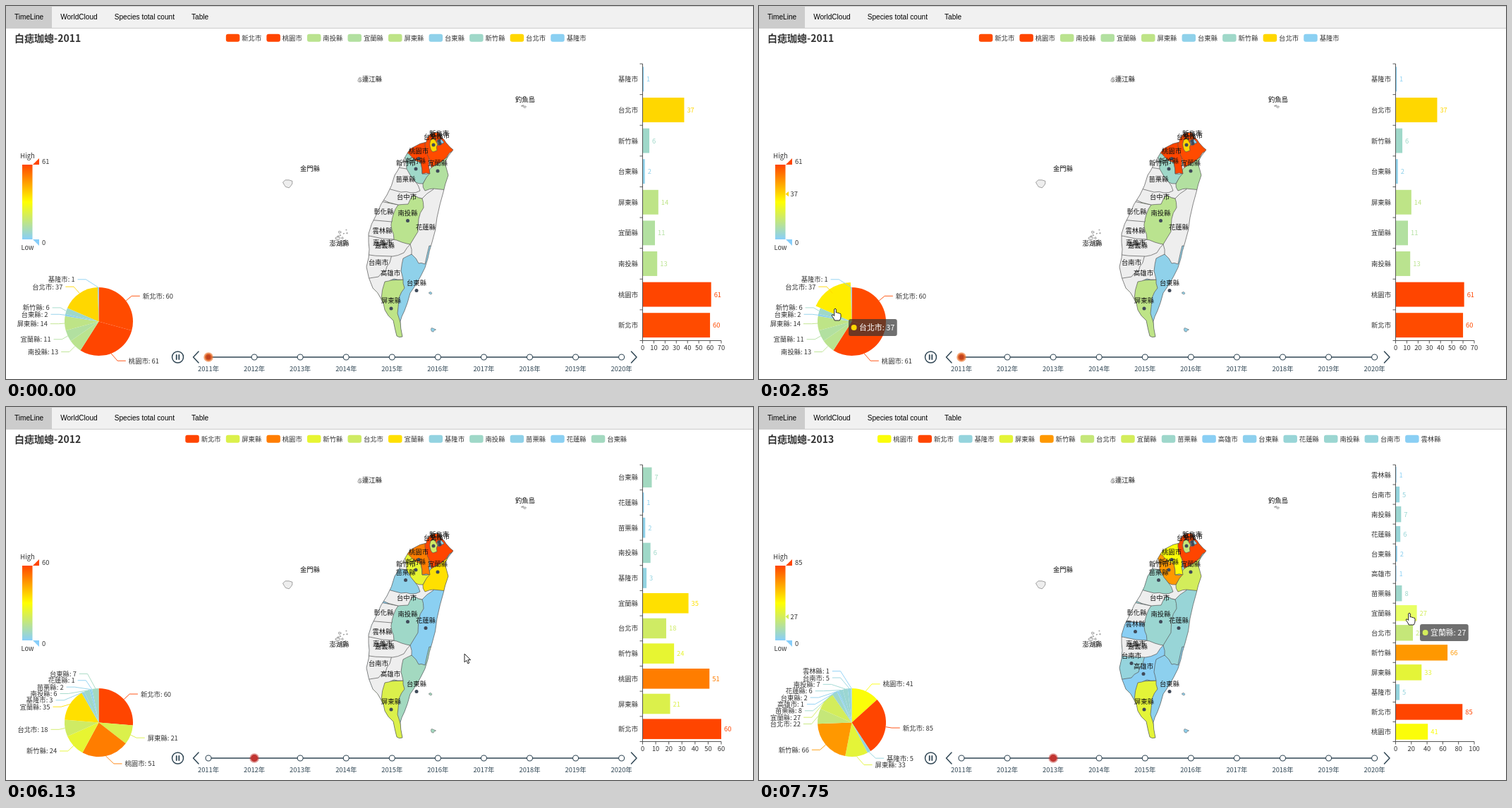
Write an HTML page with a canvas that moves like this. It is 1059 px wide and 529 px high and loops after 8 s.

```html
<!DOCTYPE html>
<html lang="zh-Hant">
<head>
<meta charset="utf-8">
<title>Timeline</title>
<style>
html, body { margin: 0; width: 100%; height: 100%; overflow: hidden; background: #fff; }
canvas { display: block; width: 1059px; height: 529px; }
</style>
</head>
<body>
<canvas id="stage"></canvas>
<script>
const W = 1059, H = 529, LOOP = 8000, MORPH = 420, TAU = Math.PI * 2;
const canvas = document.getElementById('stage');
const c = canvas.getContext('2d');
const dpr = window.devicePixelRatio || 1;
canvas.width = W * dpr;
canvas.height = H * dpr;

const CJK = '"Noto Sans CJK TC", "Noto Sans CJK JP", "Noto Sans CJK", sans-serif';
const ARIAL = '"Liberation Sans", Arial, sans-serif';
const INK = '#304654', AXIS = '#444';
const PIE = { x: 131.5, y: 447.5, r: 48.5 };

const clamp = v => Math.max(0, Math.min(1, v));
const easeOut = p => 1 - (1 - clamp(p)) ** 3;
const smooth = p => p * p * (3 - 2 * p);
const mix = (a, b, p) => a + (b - a) * p;

const ramp = [[135, 206, 250], [255, 255, 0], [255, 69, 0]];
function color(share, lift = 1) {
  const p = share * 2, i = Math.min(1, Math.floor(p));
  return `rgb(${ramp[i].map((a, k) => Math.min(255, Math.round(mix(a, ramp[i + 1][k], p - i) * lift)))})`;
}

const years = [
  { at: 0, year: 2011, data: '新北市 60|桃園市 61|南投縣 13|宜蘭縣 11|屏東縣 14|台東縣 2|新竹縣 6|台北市 37|基隆市 1' },
  { at: 2920, year: 2012, data: '新北市 60|屏東縣 21|桃園市 51|新竹縣 24|台北市 18|宜蘭縣 35|基隆市 3|南投縣 6|苗栗縣 2|花蓮縣 1|台東縣 7' },
  { at: 6900, year: 2013, data: '桃園市 41|新北市 85|基隆市 5|屏東縣 33|新竹縣 66|台北市 22|宜蘭縣 27|苗栗縣 8|高雄市 1|台東縣 2|花蓮縣 6|南投縣 7|台南市 5|雲林縣 1' }
];
for (const y of years) {
  y.rows = y.data.split('|').map(s => ({ name: s.split(' ')[0], v: +s.split(' ')[1] }));
  y.max = Math.max(...y.rows.map(r => r.v));
  y.step = y.max / 5 < 15 ? 10 : 20;
  y.axis = Math.ceil(y.max / y.step) * y.step;
  y.by = {};
  const total = y.rows.reduce((s, r) => s + r.v, 0);
  let a = 0;
  for (const r of y.rows) {
    r.a0 = a;
    r.a1 = a += r.v / total * TAU;
    r.mid = (r.a0 + r.a1) / 2;
    r.side = r.mid < Math.PI ? 1 : -1;
    r.fill = color(r.v / y.max);
    r.lit = color(r.v / y.max, 1.1);
    y.by[r.name] = r;
  }
  for (const side of [1, -1]) placeLabels(y.rows.filter(r => r.side === side));
}

// stack crowded labels, centre each stack, then set them on an ellipse
function placeLabels(rows) {
  const pitch = 9.36, runs = [];
  const wish = r => PIE.y - 59.7 * Math.cos(r.mid);
  let prev = -Infinity;
  for (const r of rows.sort((p, q) => wish(p) - wish(q))) {
    if (wish(r) > prev + pitch) runs.push([]);
    r.y = prev = Math.max(wish(r), prev + pitch);
    runs[runs.length - 1].push(r);
  }
  for (const run of runs) {
    const last = run[run.length - 1], shift = (last.y - wish(last)) / 2;
    for (const r of run) {
      r.y -= shift;
      const dy = Math.min(.96, Math.abs(r.y - PIE.y) / 63);
      r.x = PIE.x + r.side * (57 * Math.sqrt(1 - dy * dy) + 15.7);
    }
  }
}

// roughen each edge at its middle, by place
function outline(text) {
  const p = text.split(' ').map(s => s.split(',').map(Number));
  let d = '';
  p.forEach(([x, y], i) => {
    const [u, v] = p[(i + 1) % p.length], h = (x + u) * 1.7 + (y + v) * 2.3;
    d += `${i ? 'L' : 'M'}${x},${y}`;
    if (Math.hypot(u - x, v - y) > 5) d += `L${(x + u) / 2 + Math.sin(h) * 1.2},${(y + v) / 2 + Math.cos(h) * 1.2}`;
  });
  return new Path2D(d + 'Z');
}

let seed = 7;
const rand = () => (seed = seed * 16807 % 2147483647) / 2147483647;
function blob(x, y, r) {
  const path = new Path2D();
  for (let a = 0; a < TAU; a += TAU / 9) {
    const k = r * (.55 + .6 * rand());
    path.lineTo(x + k * Math.cos(a), y + k * .75 * Math.sin(a));
  }
  path.closePath();
  return path;
}

const coast = outline('599,185 606,180 613,179 618,187 624,194 634,204 622,222 627,240 620,264 611,300 604,335 598,358 588,383 573,407 565,432 559,447 562,469 554,468 549,446 537,431 531,414 520,400 511,370 515,345 514,323 525,296 540,268 551,240 558,228 570,207 578,200 596,193');

// name, centre, area; cut by the coast, each area covers those before it
const regions = [
  ['花蓮縣', 595, 313.5, '500,170 650,170 650,480 500,480'],
  ['台東縣', 582, 403.5, '620,340 600,340 594,366 585,365 575,352 540,352 540,480 620,480'],
  ['屏東縣', 546, 429, '563,388 565,400 557,414 555,436 570,475 520,475 520,388'],
  ['高雄市', 545, 378.5, '573,338 575,352 563,358 560,376 563,388 550,387 537,391 532,416 500,416 500,338'],
  ['台南市', 528, 363.5, '500,340 548,340 544,364 538,376 528,384 500,386'],
  ['嘉義縣', 537, 339, '500,320 561,330 573,338 564,350 548,355 500,351'],
  ['南投縣', 569.5, 304.5, '540,268 578,268 590,273 592,286 585,302 584,320 573,338 561,335 547,331'],
  ['雲林縣', 533.5, 318.5, '500,300 547,304 547,318 550,331 534,330 500,325'],
  ['彰化縣', 535.5, 291, '500,270 556,282 549,296 547,306 500,304'],
  ['台中市', 568, 270, '530,240 600,240 606,260 590,273 578,268 570,281 556,282 530,273'],
  ['苗栗縣', 566.5, 245.5, '530,220 568,228 581,250 587,262 574,265 560,264 530,257'],
  ['宜蘭縣', 612, 234, '603,229 617,221 640,200 650,264 606,259 594,262 591,252 600,236'],
  ['新竹縣', 581, 231, '571,200 588,222 590,238 601,237 591,252 581,250 568,231 556,220'],
  ['新竹市', 567, 222.5, '550,216 566,215 568,231 550,227'],
  ['桃園市', 585, 216.5, '560,195 597,185 600,215 601,238 590,238 588,222 576,215 566,207'],
  ['新北市', 614, 191.5, '594,190 596,170 650,170 640,205 629,208 617,221 603,229 596,208'],
  ['台北市', 606, 197, '602,190 608,188 612,196 611,205 605,207 601,199'],
  ['基隆市', 615, 195, '611,191 617,189 621,194 613,198']
].map(([name, x, y, pts]) => ({ name, x, y, shape: outline(pts) }));

// name, label, island group centre, largest size, count, spread
const isles = [
  ['金門縣', 431, 230, 400, 252, 8, 1, 0],
  ['澎湖縣', 472.5, 336, 476, 329, 5, 12, 15],
  ['連江縣', 519, 103, 503, 103, 3, 3, 4],
  ['釣魚島', 736, 132, 734, 139, 2, 3, 6],
  ['嘉義市', 534, 335, 536, 338, 4, 1, 0],
  ['台東縣', 0, 0, 602, 407, 2.5, 1, 0],
  ['台東縣', 0, 0, 605, 459, 4, 1, 0]
].map(([name, x, y, cx, cy, size, count, spread]) => ({
  name, x, y,
  shapes: Array.from({ length: count }, (_, i) =>
    blob(cx + (rand() - .5) * spread, cy + (rand() - .5) * spread * 1.6, size / (1 + i * .6)))
}));

// each tooltip glides in from the place of the one before
const hovers = [
  { a: 1470, b: 1680, on: 'map', name: '屏東縣', x: 553, y: 440 },
  { a: 1680, b: 2400, on: 'pie', name: '桃園市', x: 163, y: 450 },
  { a: 2400, b: 2920, on: 'pie', name: '台北市', x: 127, y: 444 },
  { a: 2920, b: 3800, on: 'pie', name: '台東縣', x: 127, y: 428 },
  { a: 4150, b: 4500, on: 'map', name: '花蓮縣', x: 630, y: 330 },
  { a: 5080, b: 5360, on: 'map', name: '宜蘭縣', x: 637, y: 275 },
  { a: 7330, b: 8000, on: 'bar', name: '宜蘭縣', x: 937, y: 308 }
];
// pointer: arrives, leaves, x, y
const stops = [
  [1310, 1310, 545, 500], [1500, 1560, 537, 428], [1900, 2160, 147, 459], [2500, 2920, 108, 429],
  [3400, 3870, 74, 372], [4560, 4650, 634, 311], [4800, 4950, 606, 321], [5180, 5200, 614, 259],
  [5500, 6130, 650, 350], [6750, 6900, 803.5, 354.5], [7400, 8000, 922, 292]
];
const arrow = new Path2D('M0,0V12L2.8,9.4L4.8,13.8L6.8,12.9L4.8,8.7H8.6Z');
const hand = new Path2D('M-1.3,1Q0-.8 1.3,1V6Q2.8,5 3.8,6.5Q5.2,5.6 6,7.2Q8,6.7 8,8.5V12Q8,14.5 6.2,17H-.8Q-1.8,14-4.6,10.5Q-5,8-2.8,9L-1.3,10.5Z');

function text(s, x, y, { size = 9.35, fill = '#333', align = 'left', family = CJK, weight = 'normal' } = {}) {
  c.font = `${weight} ${size}px ${family}`;
  c.fillStyle = fill;
  c.textAlign = align;
  c.textBaseline = 'middle';
  c.fillText(s, x, y);
}
function rect(x, y, w, h, fill) {
  c.fillStyle = fill;
  c.fillRect(x, y, w, h);
}
function line(pts, stroke, width = .9) {
  c.beginPath();
  pts.forEach(([x, y]) => c.lineTo(x, y));
  c.strokeStyle = stroke;
  c.lineWidth = width;
  c.stroke();
}
function poly(pts, fill) {
  c.beginPath();
  pts.forEach(([x, y]) => c.lineTo(x, y));
  c.fillStyle = fill;
  c.fill();
}
function paint(path, fill, stroke, width = 1) {
  c.fillStyle = fill;
  c.strokeStyle = stroke;
  c.lineWidth = width;
  c.fill(path);
  c.stroke(path);
}
function disc(x, y, r, fill, stroke, width = 1) {
  c.beginPath();
  c.arc(x, y, r, 0, TAU);
  if (fill) { c.fillStyle = fill; c.fill(); }
  if (stroke) { c.strokeStyle = stroke; c.lineWidth = width; c.stroke(); }
}
function pill(x, y, w, h, r, fill) {
  c.beginPath();
  c.roundRect(x, y, w, h, r);
  c.fillStyle = fill;
  c.fill();
}

function drawNav() {
  rect(0, 0, W, 32, '#f1f1f1');
  rect(0, 1, 65, 30, '#ccc');
  rect(0, 0, W, 1, '#ccc');
  rect(0, 31, W, 1, '#ccc');
  let x = 12;
  for (const s of ['TimeLine', 'WorldCloud', 'Species total count', 'Table']) {
    text(s, x, 16.3, { size: 10.1, fill: '#000', family: ARIAL });
    x += c.measureText(s).width + 24;
  }
}

function drawLegend(y) {
  text('白痣珈蟌-' + y.year, 12, 46, { size: 14, weight: 'bold' });
  const pitch = 57.55, start = 567 - (y.rows.length * pitch - 7.6) / 2;
  y.rows.forEach((r, i) => {
    pill(start + i * pitch, 39.7, 19.5, 11, 3, r.fill);
    text(r.name, start + i * pitch + 22.4, 45);
  });
}

function drawScale(y, hover) {
  const top = 225, low = 331;
  const g = c.createLinearGradient(0, low, 0, top);
  ramp.forEach((k, i) => g.addColorStop(i / 2, `rgb(${k})`));
  rect(23, top, 14.5, low - top, g);
  poly([[38, top], [47, top], [47, top - 9]], color(1));
  poly([[38, low], [47, low], [47, low + 9]], color(0));
  text('High', 30.5, 212, { align: 'center' });
  text('Low', 30.5, 342.5, { align: 'center' });
  text(y.max, 51, 220);
  text('0', 51, 335.5);
  if (!hover) return;
  const r = y.by[hover.name], iy = mix(low, top, r.v / y.max);
  poly([[37.5, iy], [42, iy - 3.6], [42, iy + 3.6]], r.fill);
  text(r.v, 44.5, iy);
}

function drawMap(y, hover) {
  const lit = hover && hover.on === 'map' && hover.name;
  const fillOf = n => n === lit ? '#ffdf33' : y.by[n] ? y.by[n].fill : '#eee';
  c.lineJoin = 'round';
  c.save();
  c.clip(coast);
  for (const r of regions) paint(r.shape, fillOf(r.name), '#555', .7);
  c.restore();
  c.strokeStyle = '#555';
  c.lineWidth = .7;
  c.stroke(coast);
  for (const g of isles) for (const s of g.shapes) paint(s, fillOf(g.name), '#666', .6);
  for (const r of regions) if (y.by[r.name]) disc(r.x, r.y, 2.5, '#404a59');
  for (const r of [...regions, ...isles.filter(g => g.x)])
    text(r.name, r.x, r.y - (y.by[r.name] ? 11.5 : 0), { align: 'center', fill: '#111' });
}

function drawPie(y, old, p, hover, t) {
  const gone = { a0: TAU, a1: TAU };
  for (const r of y.rows) {
    const from = old ? old.by[r.name] || gone : r;
    const a0 = mix(from.a0, r.a0, p), a1 = Math.max(a0, mix(from.a1, r.a1, p));
    const lit = hover && hover.on === 'pie' && hover.name === r.name;
    const radius = PIE.r + (lit ? 7 * easeOut((t - hover.a) / 250) : 0);
    c.beginPath();
    c.moveTo(PIE.x, PIE.y);
    c.arc(PIE.x, PIE.y, radius, a0 - TAU / 4, a1 - TAU / 4);
    c.fillStyle = lit ? r.lit : r.fill;
    c.fill();
    const end = r.x - 4 * r.side;
    line([[PIE.x + PIE.r * Math.sin(r.mid), PIE.y - PIE.r * Math.cos(r.mid)], [end - 11.7 * r.side, r.y], [end, r.y]], r.fill);
    text(`${r.name}: ${r.v}`, r.x, r.y, { align: r.side > 0 ? 'left' : 'right' });
  }
}

function drawBars(y, old, p, hover) {
  const x0 = 902.5, top = 82, low = 474.5, span = 111.5;
  const box = (s, i) => {
    const band = (low - top) / s.rows.length;
    return { w: s.rows[i].v / s.axis * span, cy: low - (i + .5) * band, h: band * .8 };
  };
  const band = (low - top) / y.rows.length;
  y.rows.forEach((r, i) => {
    const to = box(y, i);
    const from = !old ? to : old.rows[i] ? box(old, i) : { ...to, w: 0 };
    const w = mix(from.w, to.w, p), cy = mix(from.cy, to.cy, p), h = mix(from.h, to.h, p);
    const lit = hover && hover.on === 'bar' && hover.name === r.name;
    rect(x0, cy - h / 2, w, h, lit ? r.lit : r.fill);
    text(r.v, x0 + w + 4, cy, { fill: r.fill });
    text(r.name, 896, to.cy, { align: 'right' });
  });
  line([[x0, top], [x0, low], [x0 + span, low]], AXIS);
  for (let i = 0; i <= y.rows.length; i++) line([[x0 - 4, low - i * band], [x0, low - i * band]], AXIS);
  for (let v = 0; v <= y.axis; v += y.step) {
    const x = x0 + v / y.axis * span;
    line([[x, low], [x, low + 4]], AXIS);
    text(v, x, 484, { align: 'center' });
  }
}

function drawTimeline(index, p) {
  const cy = 498, at = i => 287 + i * 65.07;
  c.lineCap = 'round';
  disc(243.5, cy, 8, null, INK, 1.5);
  for (const x of [241.7, 245.3]) line([[x, cy - 3], [x, cy + 3]], INK, 1.8);
  line([[273, cy - 8], [265.5, cy], [273, cy + 8]], INK, 1.5);
  line([[886.5, cy - 8], [894, cy], [886.5, cy + 8]], INK, 1.5);
  c.lineCap = 'butt';
  line([[at(0), cy], [at(9), cy]], INK, 1.6);
  for (let i = 0; i < 10; i++) {
    disc(at(i), cy, 4, '#fff', INK, 1.1);
    text(2011 + i + '年', at(i), 514.5, { align: 'center', fill: INK });
  }
  const x = at(mix(Math.max(0, index - 1), index, p));
  disc(x, cy, 5, index ? '#c23531' : '#c2431f', index ? 'rgba(194,53,49,.5)' : 'rgba(236,120,50,.65)', 3.6);
}

function drawTip(y, t) {
  const i = hovers.findLastIndex(h => t >= h.a), h = hovers[i];
  if (!h || t > h.b + 120) return;
  const from = hovers[i - 1] || h, p = easeOut((t - h.a) / 380);
  const x = mix(from.x, h.x, p), ty = mix(from.y, h.y, p);
  const r = y.by[h.name], s = `${r.name}: ${r.v}`, style = { size: 10.9, weight: 500, fill: '#fff' };
  c.globalAlpha = 1 - clamp((t - h.b) / 120);
  c.font = `500 ${style.size}px ${CJK}`;
  pill(x, ty, c.measureText(s).width + 18.5, 24, 3, 'rgba(50,50,50,.7)');
  disc(x + 7.6, ty + 12, 4, r.fill);
  text(s, x + 15, ty + 12, style);
  c.globalAlpha = 1;
}

function drawCursor(t, hover) {
  const i = stops.findLastIndex(s => t >= s[0]);
  if (i < 0) return;
  const [, leave, x, y] = stops[i], [arrive, , u, v] = stops[i + 1] || [LOOP + 1, 0, x, y];
  const p = smooth(clamp((t - leave) / (arrive - leave)));
  c.save();
  c.translate(mix(x, u, p), mix(y, v, p));
  paint(hover ? hand : arrow, '#fff', '#222');
  c.restore();
}

function draw(t) {
  const index = years.findLastIndex(y => t >= y.at), y = years[index];
  const p = index ? easeOut((t - y.at) / MORPH) : 1;
  const old = p < 1 ? years[index - 1] : null;
  const hover = hovers.find(h => t >= h.a && t < h.b);
  c.setTransform(dpr, 0, 0, dpr, 0, 0);
  rect(0, 0, W, H, '#fff');
  drawNav();
  drawLegend(y);
  drawScale(y, hover);
  drawMap(y, hover);
  drawPie(y, old, p, hover, t);
  drawBars(y, old, p, hover);
  drawTimeline(index, p);
  drawTip(y, t);
  drawCursor(t, hover);
}

const start = performance.now();
function tick() {
  draw((performance.now() - start) % LOOP);
  requestAnimationFrame(tick);
}
tick();
</script>
</body>
</html>
```
